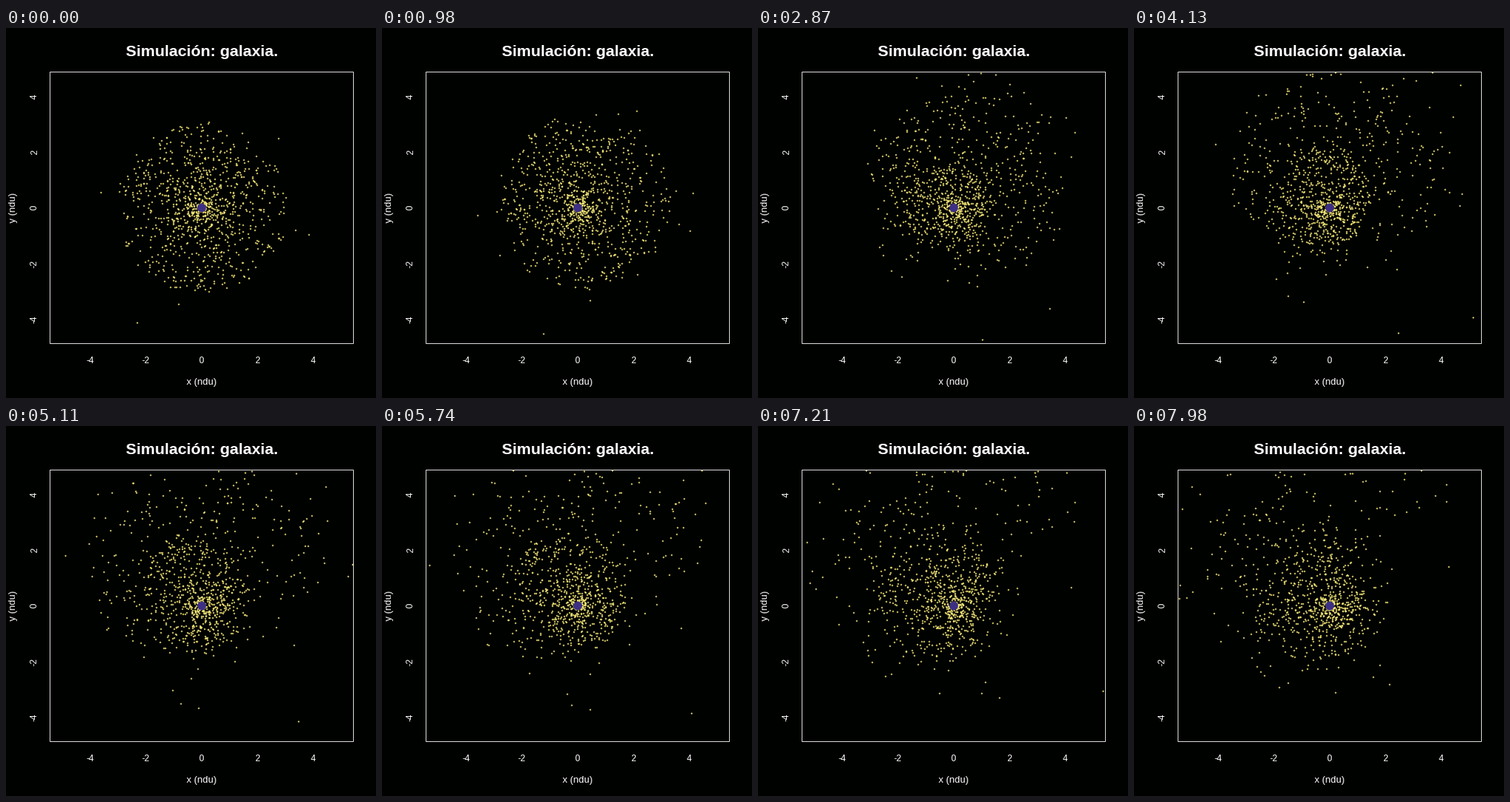
A matplotlib script for the animation above (8000 ms loop, 500x500 px).

```python
import numpy as np
import matplotlib.pyplot as plt
from matplotlib.animation import FuncAnimation
from matplotlib.patches import Circle, Rectangle

SIZE, DPI = 500, 100
LOOP, TICK, HOLD = 8000, 20, 70      # ms: loop, timer step, time per pose
POSES = LOOP // HOLD + 1
CX, CY, UNIT = 264.5, 243.0, 37.65   # plot origin and pixels per unit
LEFT, TOP, RIGHT, BOTTOM = 59.5, 59.5, 469.5, 426.5
GM = 4.5
SOFT = 0.08
SUBSTEPS = 40
BACK, STAR, CORE = "#000200", "#fff07c", "#3d2f84"


def make_stars(count=1000, seed=11):
    rng = np.random.default_rng(seed)
    radius = 0.04 + 3.05 * rng.random(count)
    angle = rng.uniform(0, 2 * np.pi, count)
    pos = radius[:, None] * np.column_stack([np.cos(angle), np.sin(angle)])
    strays = [(-3.63, 0.57), (3.85, -0.96), (3.37, -0.80),
              (-2.33, -4.12), (-0.84, -3.45), (2.75, 2.50)]
    pos[:len(strays)] = strays

    # circular counter-clockwise orbits
    radius = np.hypot(pos[:, 0], pos[:, 1])
    speed = np.sqrt(GM * radius**2 / (radius**2 + SOFT**2)**1.5)
    vel = speed[:, None] * np.column_stack([-pos[:, 1], pos[:, 0]]) / radius[:, None]

    # passing body: a push to the upper right, weak near the core
    push = np.radians(50)
    toward = np.array([np.cos(push), np.sin(push)])
    grip = radius**2 / (radius**2 + 1) * (1 + 0.08 * pos @ toward)
    vel += 0.36 * grip[:, None] * toward

    spread = np.where(rng.random(count) < 0.06, 0.55, 0.13)
    vel += spread[:, None] * rng.normal(size=(count, 2))
    return pos, vel


def pull(pos):
    dist2 = (pos**2).sum(axis=1) + SOFT**2
    return -GM * pos / (dist2**1.5)[:, None]


def simulate():
    pos, vel = make_stars()
    dt = HOLD / 1000 / SUBSTEPS
    path = [pos.copy()]
    for _ in range(POSES - 1):
        for _ in range(SUBSTEPS):
            vel += pull(pos) * dt / 2
            pos += vel * dt
            vel += pull(pos) * dt / 2
        path.append(pos.copy())
    return path


def to_px(x, y):
    return CX + UNIT * x, CY - UNIT * y


path = simulate()

fig = plt.figure(figsize=(SIZE / DPI, SIZE / DPI), dpi=DPI, facecolor=BACK)
ax = fig.add_axes([0, 0, 1, 1])
ax.set_xlim(0, SIZE)
ax.set_ylim(SIZE, 0)
ax.axis("off")


def label(x, y, text, px, rotation=0, weight="normal"):
    ax.text(x, y, text, color="white", fontsize=px * 72 / DPI,
            family="Liberation Sans", weight=weight, ha="center",
            va="baseline", rotation=rotation, rotation_mode="anchor")


label(264.5, 38, "Simulación: galaxia.", 21.4, weight="bold")
label(264.5, 482, "x (ndu)", 13)
label(13, 243, "y (ndu)", 13, rotation=90)
for value in (-4, -2, 0, 2, 4):
    px, py = to_px(value, value)
    label(px - 0.5, 453, str(value), 12)
    label(42, py, str(value), 12, rotation=90)

frame_box = Rectangle((LEFT, TOP), RIGHT - LEFT, BOTTOM - TOP, fill=False,
                      edgecolor="#dcdcdc", linewidth=72 / DPI, zorder=4,
                      snap=False)
ax.add_patch(frame_box)
stars, = ax.plot([], [], "o", color=STAR, markersize=2.1 * 72 / DPI,
                 markeredgewidth=0, zorder=2)
stars.set_clip_path(frame_box)
ax.add_patch(Circle((CX, CY), 5.9, facecolor=CORE, linewidth=0, zorder=3))


def update(i):
    pose = (i * TICK + TICK // 2) // HOLD
    x, y = to_px(*path[pose].T)
    inside = (x > LEFT) & (x < RIGHT) & (y > TOP) & (y < BOTTOM)
    stars.set_data(x[inside], y[inside])
    return stars,


anim = FuncAnimation(fig, update, frames=LOOP // TICK, interval=TICK,
                     repeat=True, repeat_delay=0, blit=False)
plt.show()
```
